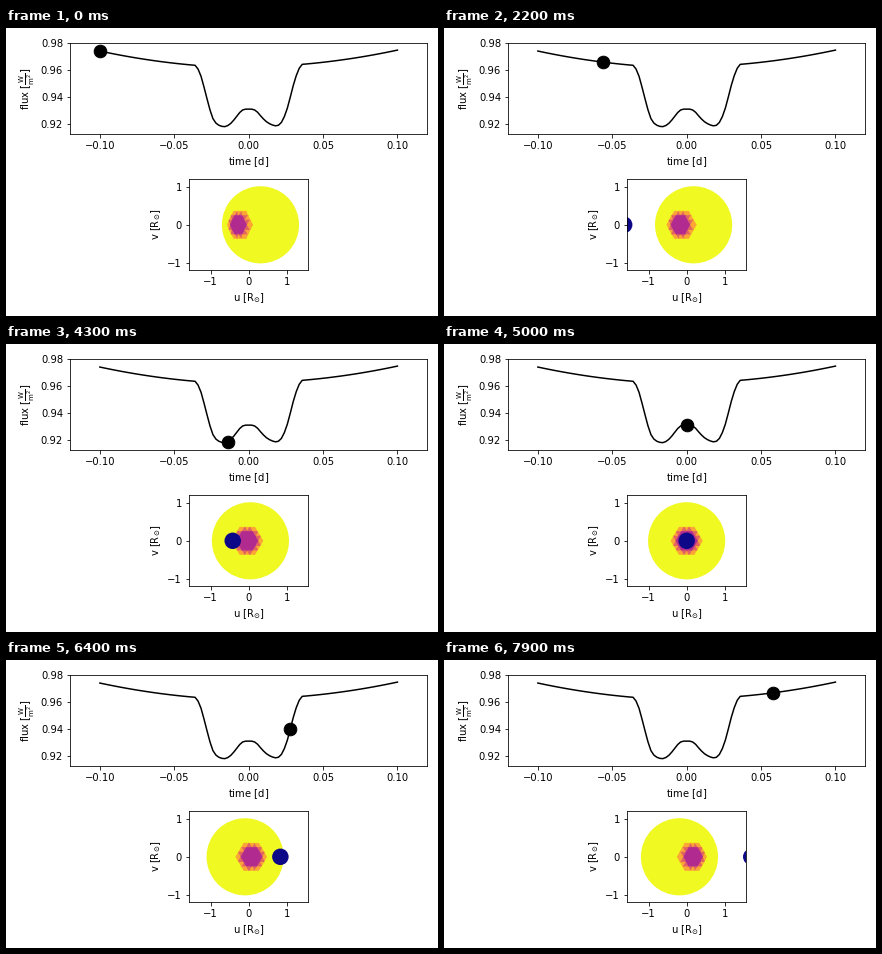
A matplotlib script that plays this animation: 432 px wide and 288 px high, repeating every 8000 ms.

```python
import numpy as np
import matplotlib.pyplot as plt
from matplotlib.animation import FuncAnimation
from matplotlib.collections import PolyCollection
from matplotlib.patches import Ellipse

W, H = 432, 288
FRAMES, INTERVAL = 80, 100
STAR_ORBIT, PLANET_ORBIT = 0.53, 4.77
R_STAR, R_PLANET = 1.015, 0.217
SIDE = 0.139  # mesh triangle side, in radians on the star
PLASMA = plt.get_cmap("plasma")

plt.rcParams.update({"font.family": "DejaVu Sans", "font.size": 10})

# Light curve: smooth wings outside the eclipse, sampled values inside it
ECLIPSE = np.array([
    9636, 9608, 9555, 9475, 9390, 9308, 9243, 9210, 9194, 9186, 9184, 9192,
    9208, 9232, 9260, 9288, 9307, 9313, 9313, 9313, 9307, 9290, 9264, 9240,
    9220, 9206, 9196, 9190, 9194, 9215, 9258, 9320, 9402, 9488, 9560, 9614,
    9643]) / 1e4
T_ECL = np.linspace(-0.036, 0.036, len(ECLIPSE))

time = np.linspace(-0.1, 0.1, 101)
wing = np.clip(np.abs(time) - 0.036, 0, None)
flux = np.interp(time, T_ECL, ECLIPSE) + 0.0932 * wing + 1.107 * wing**2


def add_axes(fig, left, top, right, bottom):
    return fig.add_axes([left / W, 1 - bottom / H,
                         (right - left) / W, (bottom - top) / H])


def node(i, j):
    """Longitude and latitude of a point of the triangular mesh."""
    return SIDE * (i + j / 2), SIDE * np.sqrt(3) / 2 * j


def rings(i, j):
    return max(abs(i), abs(j), abs(i + j))


def spot_mesh():
    """Triangles touching the spot, coloured by how many corners lie in it."""
    tris, colors = [], []
    for i in range(-4, 4):
        for j in range(-4, 4):
            for tri in ([(i, j), (i + 1, j), (i, j + 1)],
                        [(i + 1, j), (i + 1, j + 1), (i, j + 1)]):
                inside = sum(rings(*p) <= 2 for p in tri)
                if inside:
                    tris.append([node(*p) for p in tri])
                    colors.append(PLASMA(1 - 0.2 * inside))
    return np.array(tris), np.array(colors)


fig = plt.figure(figsize=(W / 72, H / 72), dpi=72, facecolor="white")

ax_lc = add_axes(fig, 64.1, 14.9, 421.2, 106.1)
ax_lc.plot(time, flux, "k-", lw=1.5)
dot, = ax_lc.plot([], [], "ko", ms=12.6, mew=1)
ax_lc.set(xlim=(-0.12, 0.12), ylim=(0.9129, 0.9801),
          xticks=[-0.10, -0.05, 0, 0.05, 0.10],
          yticks=[0.92, 0.94, 0.96, 0.98],
          xlabel="time [$\\mathrm{d}$]",
          ylabel="flux [$\\mathrm{\\frac{W}{m^{2}}}$]")

ax_sky = add_axes(fig, 183.1, 151.2, 302.2, 242.4)
ax_sky.set(xlim=(-1.567, 1.567), ylim=(-1.2, 1.2),
           xticks=[-1, 0, 1], yticks=[-1, 0, 1],
           xlabel="u [$\\mathrm{R_{\\odot}}$]",
           ylabel="v [$\\mathrm{R_{\\odot}}$]")

star = Ellipse((0, 0), 2 * R_STAR, 2 * R_STAR, fc=PLASMA(1.0), lw=0, zorder=1)
planet = Ellipse((0, 0), 2 * R_PLANET, 2 * R_PLANET, fc=PLASMA(0.0), lw=0,
                 zorder=1.2)
spot = PolyCollection([], linewidths=1, zorder=1.1)
ax_sky.add_patch(star)
ax_sky.add_collection(spot, autolim=False)
ax_sky.add_patch(planet)

TRIS, COLORS = spot_mesh()


def update(n):
    phase = 2 * np.pi * time[n]
    u_star = -STAR_ORBIT * np.sin(phase)
    star.center = (u_star, 0)
    planet.center = (PLANET_ORBIT * np.sin(phase), 0)

    # The spot turns with the star; nearer triangles are drawn last
    lon, lat = TRIS[..., 0] + phase, TRIS[..., 1]
    uv = np.stack([u_star + np.cos(lat) * np.sin(lon), np.sin(lat)], axis=-1)
    order = np.argsort((np.cos(lat) * np.cos(lon)).mean(axis=1), kind="stable")
    spot.set_verts(uv[order])
    spot.set_facecolor(COLORS[order])
    spot.set_edgecolor(COLORS[order])

    dot.set_data([time[n]], [flux[n]])
    return star, spot, planet, dot


anim = FuncAnimation(fig, update, frames=FRAMES, interval=INTERVAL,
                     repeat=True, repeat_delay=0, blit=False)
plt.show()
```
